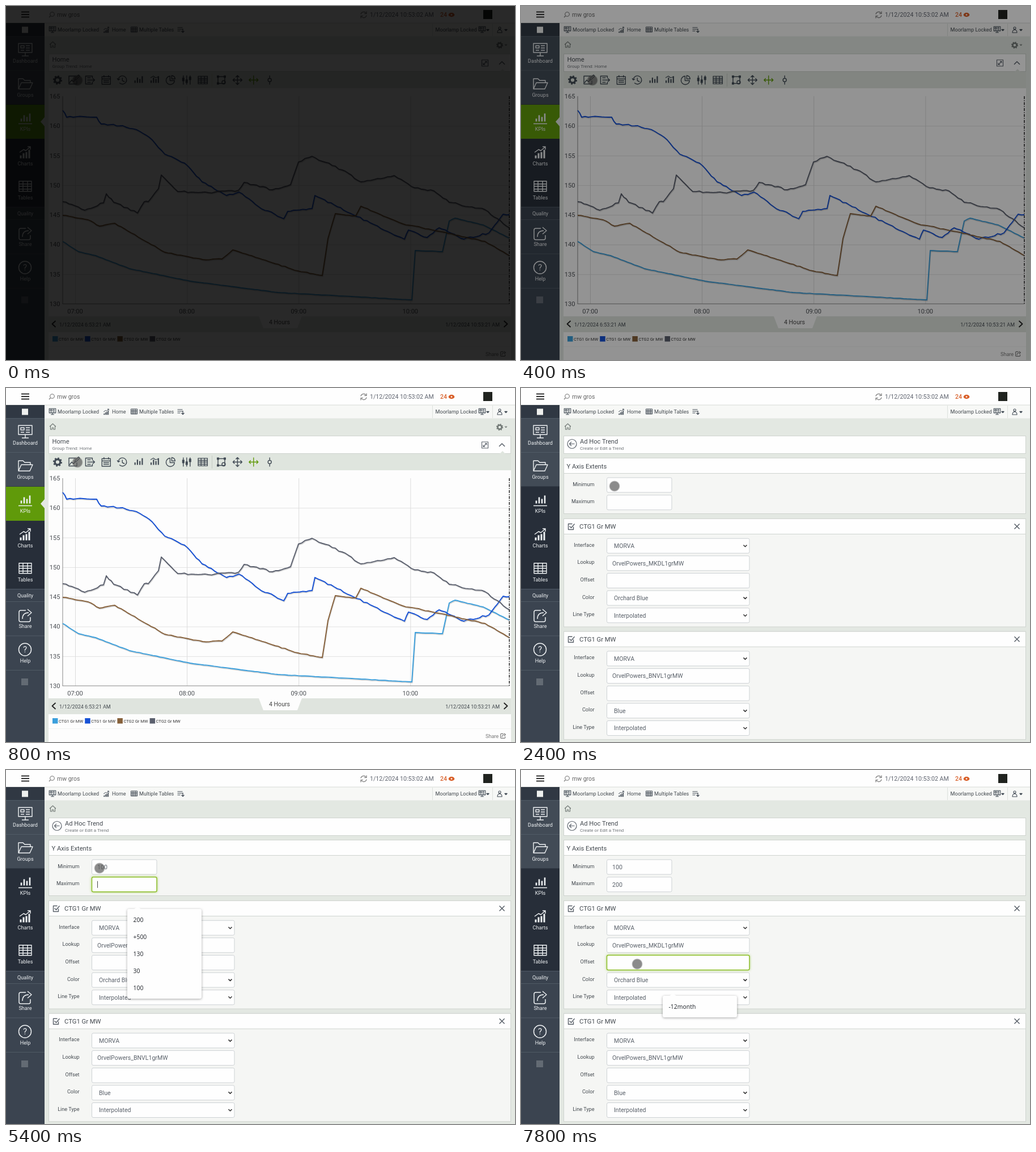
An HTML page for the animation above (8000 ms loop, 898x624 px).

```html
<!DOCTYPE html>
<html lang="en">
<head>
<meta charset="utf-8">
<style>
html, body { margin: 0; width: 100%; height: 100%; overflow: hidden; background: #000; }
svg { display: block; width: 898px; height: 624px; font-family: Roboto, sans-serif; }
</style>
</head>
<body>
<svg id="stage" viewBox="0 0 898 624"></svg>
<script>
const INK = '#424b55', MUTED = '#596069', PALE = '#e3e8e2', LINE = '#cfd4cf', PAPER = '#fefefe', GREEN = '#609a0a';

// Text is centred vertically on y.
const text = (x, y, s, size = 9.1, fill = '#444a50', anchor = 'start', extra = '') =>
  `<text x="${x}" y="${y + size * 0.355}" font-size="${size}" fill="${fill}" text-anchor="${anchor}" ${extra}>${s}</text>`;
const rect = (x, y, w, h, fill, extra = '') =>
  `<rect x="${x}" y="${y}" width="${w}" height="${h}" fill="${fill}" ${extra}/>`;
const box = (y, h, fill = PAPER) => rect(75.5, y, 815, h, fill, `stroke="${LINE}"`);
const icon = (x, y, d, color = INK, width = 1.4, scale = 1) =>
  `<path transform="translate(${x} ${y}) scale(${scale})" d="${d}" fill="none" stroke="${color}" stroke-width="${width / scale}" stroke-linejoin="round"/>`;
const ring = (x, y, r, color = INK, width = 1.4, extra = '') =>
  `<circle cx="${x}" cy="${y}" r="${r}" fill="none" stroke="${color}" stroke-width="${width}" ${extra}/>`;
const gear = (x, y, r, color) =>
  ring(x, y, r * 0.6, color, r * 0.42) +
  ring(x, y, r * 0.86, color, r * 0.3, `stroke-dasharray="${r * 0.3377}"`);
const repeat = (n, make) => Array.from({ length: n }, (_, i) => make(i)).join('');

const shapes = {
  monitor: 'M-12-11h24v16h-24zM-6 11h12M0 5v6M-8-7h6v4h-6zM1-7h7M1-3h7M-8 1h6M1 1h7',
  folder: 'M-12 9V-9h8l3 3h10v4M-12 9l5-11h20l-5 11z',
  bars: 'M-7 6v-5M-2 6v-11M3 6v-8M8 6v-14',
  growth: 'M-8 11v-5M-3 11v-9M2 11v-11M7 11v-15',
  arrow: 'M-10 0l7-5 4 2 8-7M4-10h5v5',
  table: 'M-11-9h22v18h-22zM-11-4h22M-11 0h22M-11 5h22M-4-9v18M4-9v18',
  share: 'M1-9h-9q-3 0-3 3v14q0 3 3 3h14q3 0 3-3v-5M-5 6c0-8 4-11 11-11M4-11l7 6-7 6',
  home: 'M-5.5 0L0-5 5.5 0M-4-1v6h2.8v-3h2.4v3h2.8v-6',
  person: 'M-4 5q0-5 4-5t4 5zM-2-3a2 2 0 1 0 4 0a2 2 0 1 0-4 0',
  down: 'M-2-1L0 1 2-1z',
  menu: 'M-7-4.5h14M-7 0h14M-7 4.5h14',
  refresh: 'M-5-1a5 5 0 0 1 9-2M5 1a5 5 0 0 1-9 2M5-6v4h-4M-5 6v-4h4',
  sort: 'M-6-4h9M-6-1h9M-6 2h5M3.5-2v6M1 2l2.5 2.5L6 2',
  close: 'M-4.5-4.5l9 9M4.5-4.5l-9 9',
  check: 'M4 0v5h-9v-10h7M-3-1l3 3 6-7',
  editChart: 'M5 1v6h-14v-14h12M-8 5l4-5 3 3 4-4M1 1l1-4 6-6 2 2-6 6z',
  exportList: 'M4-3v-4h-12v14h12v-4M-5-4h6M-5 0h6M-5 4h6M1 0h7M5-3l3 3-3 3',
  calendar: 'M-7.5-6h15v13.5h-15zM-7.5-2h15M-4-8.5v4M4-8.5v4M-5 1h10M-5 4h10',
  history: 'M-7-1a7.3 7.3 0 1 1 2 6M-9-3l2 3 3-2M0-4v5l4 2',
  pie: 'M-1-7a7.5 7.5 0 1 0 8 8h-8zM2-8a7 7 0 0 1 6 6h-6z',
  sticks: 'M-6-8v16M0-8v16M6-8v16',
  candles: 'M-6-4v6M0-1v6M6-6v6',
  zoom: 'M-6-6h12v12h-12z',
  move: 'M-8 0h16M0-8v16M-5-3l-3 3 3 3M5-3l3 3-3 3M-3-5l3-3 3 3M-3 5l3 3 3-3',
  split: 'M-8 0h16M0-8v16M-5-3l-3 3 3 3M5-3l3 3-3 3',
  node: 'M0-8v5M0 3v5M-3 0a3 3 0 1 0 6 0a3 3 0 1 0-6 0'
};

function header() {
  const account = 'Moorlamp Locked', grey = '#777';
  return rect(0, 0, 898, 30, PAPER) + rect(68, 30, 830, 23.5, '#f7f8f6') + rect(0, 29.5, 898, 1, '#d8dcd8') +
    icon(34, 15, shapes.menu, '#333', 1.8) +
    ring(81.5, 14.5, 3.8, grey, 1.1) + icon(81.5, 14.5, 'M-3 3l-2.5 2.5', grey, 1.3) +
    text(90, 15.5, 'mw gros', 10.5, '#666') + icon(631, 15.5, shapes.refresh, grey, 1.2) +
    text(642, 15.5, '1/12/2024 10:53:02 AM', 10.6, '#606570') +
    text(766, 15.5, '24', 10.6, '#d9602a', 'start', 'font-weight="500"') +
    '<ellipse cx="786" cy="15.5" rx="5.3" ry="3.7" fill="#d9602a"/><circle cx="786" cy="15.5" r="1.3" fill="#fff"/>' +
    rect(842, 7, 16, 16, '#20231f') +
    icon(82, 41.5, shapes.monitor, INK, 1.1, 0.48) + text(91, 42, account) +
    icon(177, 42, shapes.growth, INK, 1.6, 0.48) + icon(177, 42, shapes.arrow, INK, 1, 0.48) + text(187, 42, 'Home') +
    icon(226, 41.5, shapes.table, INK, 1, 0.5) + text(235, 42, 'Multiple Tables') +
    icon(308.5, 42, shapes.sort, INK, 1.2) + rect(752, 31, 1, 22, '#dde1dd') + rect(858, 31, 1, 22, '#dde1dd') +
    text(757.5, 42, account) + icon(840, 41.5, shapes.monitor, INK, 1.1, 0.48) +
    icon(850, 42.5, shapes.down, INK, 1.3) + icon(871, 42, shapes.person, INK, 1.1) +
    icon(882, 42.5, shapes.down, INK, 1.3) + icon(82.5, 68, shapes.home, '#727976', 1.1);
}

function sidebar(kpiActive) {
  const white = '#eef1f3', pitch = 60.2;
  const items = [['Dashboard', 'monitor', 1.4], ['Groups', 'folder', 1.4], ['KPIs', 'bars', 2.6],
    ['Charts', 'growth', 3], ['Tables', 'table', 1.4]];
  let s = rect(0, 30, 68, 594, '#3b4450') + rect(0, 30, 68, 23, '#303843') + rect(28, 36.5, 11, 11, '#eef0ee') +
    rect(0, 53, 68, 120.5, '#424b56') + rect(0, 173.5, 68, 180.5, '#272e39') + rect(0, 354, 68, 22, '#39424e');
  [53, 113, 354, 376, 436.5, 497].forEach(y => s += rect(0, y, 68, 0.8, '#56606b'));
  if (kpiActive) s += rect(0, 174, 68, 60, GREEN) + `<path d="M68 196l-7 8 7 8z" fill="${PALE}"/>`;
  items.forEach(([name, shape, width], i) => {
    const y = 77 + i * pitch;
    s += icon(34, y, shapes[shape], white, width) + text(34, y + 19.7, name, 9.1, white, 'middle');
  });
  return s + icon(34, 198, 'M-12 9.5h24', white, 1.5) + icon(34, 258, shapes.arrow, white) +
    text(34, 365.5, 'Quality', 9.1, white, 'middle') +
    icon(34, 401, shapes.share, white, 1.5) + text(34, 420, 'Share', 9.1, white, 'middle') +
    ring(33.5, 461, 11, white, 1.5) + text(33.5, 461, '?', 15, white, 'middle') +
    text(34, 480.5, 'Help', 9.1, white, 'middle') + rect(27, 512, 12, 12, '#636b74');
}

const shell = kpiActive => rect(0, 0, 898, 624, PALE) + header() + sidebar(kpiActive);

// Each trend is a few turning points joined by a line with seeded roughness.
const trends = [
  { name: 'CTG1', color: '#3b9fdc', rough: 0.6,
    points: '100,415 128,433 158,440 218,463 325,485 480,505 716,518 722,431 770,433 782,379 792,374 842,386 888,409' },
  { name: 'CTG1', color: '#1651d6', rough: 3,
    points: '100,184 107,196 160,196 168,208 206,211 236,221 258,236 280,261 315,277 346,310 389,334 411,328 446,354 490,375 497,362 540,357 545,334 613,368 703,411 710,395 743,408 764,391 808,411 852,400 877,367 888,368' },
  { name: 'CTG2', color: '#86603a', rough: 1.5,
    points: '100,369 145,377 165,388 192,383 280,434 347,447 381,446 400,430 515,467 558,475 568,410 581,366 617,370 626,353 700,384 745,393 845,415 888,440' },
  { name: 'CTG2', color: '#5b606e', rough: 3,
    points: '100,345 139,360 172,347 177,331 190,346 232,365 244,345 251,345 269,322 274,298 303,327 357,329 410,325 420,311 470,324 502,315 516,275 540,265 593,289 626,310 685,299 715,318 755,326 782,346 845,359 888,391' }
];

function tracePath({ points, rough }, seed) {
  const p = points.split(' ').map(v => v.split(',').map(Number));
  const random = () => (seed = seed * 16807 % 2147483647) / 2147483647 - 0.5;
  let d = 'M' + p[0];
  for (let i = 1; i < p.length; i++) {
    const [ax, ay] = p[i - 1], [bx, by] = p[i], n = Math.ceil((bx - ax) / 6);
    for (let k = 1; k <= n; k++) {
      const u = k / n, wobble = k < n ? rough * random() : 0;
      d += `L${ax + (bx - ax) * u} ${ay + (by - ay) * u + wobble}`;
    }
  }
  return d;
}

function toolbar() {
  const tools = ['editChart', 'exportList', 'calendar', 'history', 'bars', 'bars', 'pie', 'sticks', 'table'];
  const modes = ['zoom', 'move', 'split', 'node'], y = 130.5, pitch = 28.4;
  const row = (names, start) => names.map((name, i) =>
    icon(start + i * pitch, y, shapes[name], name === 'split' ? GREEN : INK, name === 'bars' ? 2.2 : 1.4,
      { bars: 0.85, table: 0.74 }[name])).join('');
  return gear(91, y, 8, INK) + row(tools, 120) + icon(262, y, 'M-7-4l5-3 4 3 6-2', INK, 1.2) +
    icon(318.8, y, shapes.candles, INK, 4) + rect(363, 119, 1, 23, '#c5cbc4') + row(modes, 380) +
    icon(380, y, 'M-8-6h4M4-6h4M-8 6h4', INK, 4) + ring(384, y + 4, 3);
}

function plot() {
  let s = repeat(8, i => {
    const y = 159 + i * 52.3;
    return (i % 7 ? rect(100, y, 788, 1, '#e2e2e2') : '') + text(95.5, y, 165 - i * 5, 11.1, '#4b4f54', 'end');
  });
  s += repeat(4, i => {
    const x = 122 + i * 197.1, hour = String(7 + i).padStart(2, 0);
    return rect(x, 159, 1, 366, '#dcdcdc') + text(x, 538, hour + ':00', 11.1, '#4b4f54', 'middle');
  });
  s += rect(99.5, 159, 1, 366, '#888') + rect(99.5, 524.5, 789, 1, '#888');
  trends.forEach((trend, i) => {
    const d = tracePath(trend, 91 + i), x = 82 + i * 57.2;
    s += icon(0.7, 1.5, d, 'rgba(60,60,60,.22)', 2) + icon(0, 0, d, trend.color, 1.9) +
      rect(x, 582, 9.5, 9.5, trend.color) + text(x + 11, 587.5, trend.name + ' Gr MW', 7.5, '#333');
  });
  return s + '<path d="M888 159v366" stroke="#222" stroke-width="1.5" stroke-dasharray="5 2 1.5 2"/>';
}

function chartPage() {
  return shell(true) + gear(871, 69, 6, '#727976') + icon(882, 69, shapes.down, '#727976', 1) +
    box(84.5, 31) + text(81.5, 94.5, 'Home', 11.2) + text(81.5, 106, 'Group Trend: Home', 8.1, '#707579') +
    icon(845, 100.5, 'M-5.5-5.5h11v11h-11zM-3 3l6-6M0-3h3v3M-3 0v3h3', MUTED, 1.1) +
    icon(875, 100.5, 'M-5 2.5l5-5 5 5', MUTED, 1.5) +
    rect(75, 116, 816, 29, '#dfe5de') + '<path d="M871 116l5-5 5 5z" fill="#dfe5de"/>' + toolbar() +
    rect(75, 145, 816, 402, '#fdfdfd') + rect(75, 575, 816, 49, '#fdfdfd') + rect(75, 600, 816, 0.6, '#eceeec') +
    plot() + rect(75, 547, 816, 28, '#dfe4de') + '<path d="M446 547h76l-8 21h-60z" fill="#fdfdfd"/>' +
    text(482.5, 557.5, '4 Hours', 10.6, '#444', 'middle') +
    icon(84, 560.5, 'M3.5-5.5l-6 5.5 6 5.5', '#222', 1.8) + icon(882, 560.5, 'M-3.5-5.5l6 5.5-6 5.5', '#222', 1.8) +
    text(94, 561.5, '1/12/2024 6:53:21 AM', 9) + text(871, 561.5, '1/12/2024 10:53:21 AM', 9, '#444a50', 'end') +
    text(846, 614, 'Share', 9.1, '#777') + icon(877, 613, shapes.share, '#777', 1.1, 0.4);
}

const input = (y, w) => rect(151.5, y, w, 26, PAPER, 'rx="2.5" stroke="#cdd1d4"');
const panel = (y, h) => box(y, h, '#f5f6f4') + box(y, 27);
const label = (y, s) => text(129.5, y, s, 9.1, '#444a50', 'end');

function tagPanel(y, lookup, color) {
  const rows = { Interface: 'MORVA', Lookup: lookup, Offset: '', Color: color, 'Line Type': 'Interpolated' };
  let s = panel(y, 190.5) + icon(88.5, y + 14, shapes.check, MUTED, 1.4) +
    text(103, y + 14, 'CTG1 Gr MW', 11.25) + icon(875, y + 13.5, shapes.close, MUTED, 1.5);
  Object.entries(rows).forEach(([name, value], i) => {
    const top = y + 34.7 + i * 30.65, select = name !== 'Lookup' && name !== 'Offset';
    s += label(top + 11.3, name) + input(top, 251.5) + text(select ? 164 : 161, top + 13, value, 10.55, MUTED);
    if (select) s += icon(395.5, top + 13, 'M-3-1.5l3 3 3-3', '#333', 1.5);
  });
  return s;
}

function formPage() {
  return shell(false) + box(84.5, 31) +
    ring(90, 98.5, 8, MUTED, 1.2) + icon(90, 98.5, 'M4.5 0h-9M-1-3.5l-3.5 3.5 3.5 3.5', MUTED, 1.2) +
    text(104, 94.5, 'Ad Hoc Trend', 11.15) + text(104, 106, 'Create or Edit a Trend', 8.1, '#707579') +
    panel(123.5, 98) + text(80.5, 138, 'Y Axis Extents', 11.2) +
    label(169.5, 'Minimum') + label(200, 'Maximum') + input(158, 114.5) + input(188.8, 114.5) +
    tagPanel(230.5, 'OrvelPowers_MKDL1grMW', 'Orchard Blue') +
    tagPanel(429.2, 'OrvelPowers_BNVL1grMW', 'Blue');
}

// Times: focus gained, list opened, typing from, ms per key, list closed, focus lost.
const fields = [
  { y: 158, w: 114.5, popup: [214, 211], focus: 2600, open: 2800, type: 3400, key: 500, close: 4600, blur: 4600,
    value: '100', past: ['100', '130', '30', '0', '50', '20'] },
  { y: 188.8, w: 114.5, popup: [214, 245], focus: 4600, open: 5000, type: 5800, key: 200, close: 6400, blur: 6800,
    value: '200', past: ['200', '+500', '130', '30', '100'] },
  { y: 326.5, w: 251.5, popup: [250, 398], focus: 6800, open: 6800, type: 8000, key: 200, close: 8000, blur: 8000,
    value: '', past: ['-12month'] }
];

function popup([x, y], items) {
  return rect(x, y, 131, items.length * 30 + 8, PAPER, 'rx="3" style="filter:drop-shadow(0 1px 2px rgba(0,0,0,.35))"') +
    `<path d="M${x + 12} ${y + 0.5}l6-5.5 6 5.5z" fill="${PAPER}"/>` +
    items.map((s, i) => text(x + 10.5, y + 19 + i * 30, s, 10.4, '#2c3036', 'start',
      'font-family="Noto Sans, sans-serif"')).join('');
}

function entryState(t) {
  let s = '', list = '';
  for (const f of fields) {
    const typed = f.value.slice(0, Math.max(0, Math.floor((t - f.type) / f.key) + 1));
    if (t >= f.focus && t < f.blur) {
      s += rect(151.5, f.y, f.w, 26, PAPER,
        'rx="2.5" stroke="#8fbf2c" stroke-width="1.5" style="filter:drop-shadow(0 0 2px rgba(130,190,30,.6))"');
      if (f.value) s += rect(161 + typed.length * 5.95, f.y + 7, 0.9, 12, '#333');
    }
    s += text(161, f.y + 13.2, typed, 10.6, MUTED);
    if (t >= f.open && t < f.close) list = popup(f.popup, f.past.filter(v => v.startsWith(typed)));
  }
  return s + list;
}

function glide(t, start, end, from, to) {
  const p = Math.min(1, Math.max(0, (t - start) / (end - start))), e = p * p * (3 - 2 * p);
  return from.map((v, i) => v + (to[i] - v) * e);
}

const stage = document.getElementById('stage');
stage.innerHTML = `<defs><radialGradient id="dot"><stop offset=".78" stop-color="#555" stop-opacity=".68"/>
  <stop offset="1" stop-color="#555" stop-opacity="0"/></radialGradient></defs>
  <g id="chart">${chartPage()}</g><g id="form">${formPage()}<g id="entry"></g></g>
  <circle id="pointer" r="10" fill="url(#dot)"/>${rect(0, 0, 898, 624, '#000', 'id="shade"')}`;
const [chart, form, entry, pointer, shade] =
  ['chart', 'form', 'entry', 'pointer', 'shade'].map(id => document.getElementById(id));

let shown = -1;
function draw(now) {
  const t = Math.floor(now % 8000 / 200) * 200;
  if (t !== shown) {
    shown = t;
    const onForm = t >= 1600;
    chart.style.display = onForm ? 'none' : '';
    form.style.display = onForm ? '' : 'none';
    entry.innerHTML = entryState(t);
    const [x, y] = t < 6200 ? glide(t, 1600, 2400, [126, 131], [165, 173])
      : glide(t, 6200, 6800, [165, 173], [205, 342]);
    pointer.setAttribute('cx', x);
    pointer.setAttribute('cy', y);
    shade.setAttribute('opacity', Math.max(0, 0.84 - t * 0.00105));
  }
  requestAnimationFrame(draw);
}
draw(0);
</script>
</body>
</html>
```
